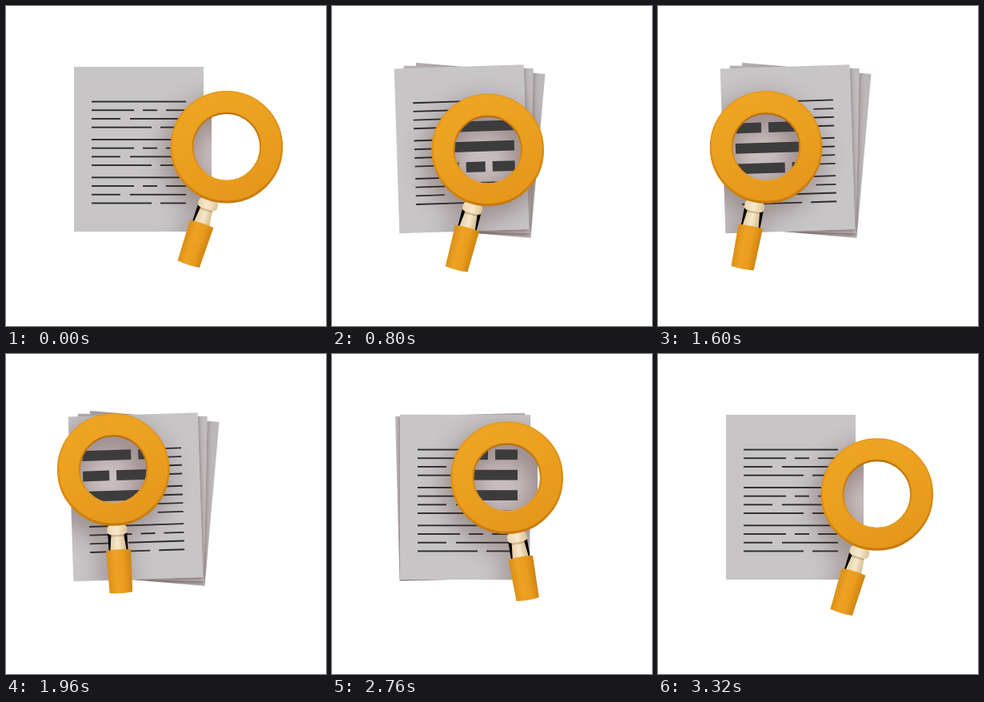
An HTML page with a canvas for the animation above (3360 ms loop, 400 by 400 pixels).

```html
<!DOCTYPE html>
<html lang="en">
<head>
<meta charset="utf-8">
<title>Document search</title>
<style>
  html, body { margin: 0; width: 100%; height: 100%; overflow: hidden; background: #fff; }
  canvas { display: block; width: 400px; height: 400px; }
</style>
</head>
<body>
<canvas id="stage" width="400" height="400"></canvas>
<script>
const ctx = document.getElementById('stage').getContext('2d');
const LOOP = 3360, STEP = 40;
const RAD = Math.PI / 180;

// Smooth looping motion through poses [time, ...values], without overshoot.
function motion(poses) {
  const n = poses.length;
  const time = i => poses[(i + n) % n][0] + Math.floor(i / n) * LOOP;
  const value = (i, k) => poses[(i + n) % n][k];
  const rate = (i, k) => (value(i + 1, k) - value(i, k)) / (time(i + 1) - time(i));
  const slope = (i, k) => {
    const a = rate(i - 1, k), b = rate(i, k);
    return a * b > 0 ? 2 * a * b / (a + b) : 0;
  };
  return t => {
    let i = 0;
    while (i < n - 1 && time(i + 1) <= t) i++;
    const d = time(i + 1) - time(i), u = (t - time(i)) / d, v = 1 - u;
    const ease = u * u * (3 - 2 * u);
    return poses[i].slice(1).map((p, j) => p + (value(i + 1, j + 1) - p) * ease
      + d * u * v * (v * slope(i, j + 1) - u * slope(i + 1, j + 1)));
  };
}

// Lens centre x, y and tilt in degrees.
const lensAt = motion([
  [0, 275.8, 176.3, 18],
  [270, 283, 179.5, 22.5],
  [480, 277.7, 182, 24],
  [560, 270.5, 182, 23],
  [800, 194.7, 180, 14.7],
  [1280, 163, 205.5, 13],
  [1600, 135, 176.5, 11],
  [1800, 116, 150, 4],
  [2080, 157, 143, -9],
  [2280, 198, 145, -15],
  [2760, 218.7, 154.8, -9.7]
]);

// Angles of the back, middle and front page.
const fanAt = motion([
  [0, 0, 0, 0],
  [280, 1.5, 0.8, -2.7],
  [480, 3.7, 1.1, -1.85],
  [720, 5, 1.2, -1.85],
  [2280, 5, 1.2, -1.85],
  [2760, 0.2, -1.5, 0],
  [3040, 0, 0, 0]
]);

const PAGE_COLORS = ['#bcb7b8', '#c0bbbc', '#c8c5c7'];
// Gaps in each line of text; the rows repeat down the page.
const SMALL_GAPS = [[], [160, 171, 189, 200], [143, 155], [182, 193]];
const LARGE_GAPS = [[162, 171, 195, 204], [134, 143], []];

function gradient(x0, y0, x1, y1, ...colors) {
  const g = ctx.createLinearGradient(x0, y0, x1, y1);
  colors.forEach((c, i) => g.addColorStop(i / (colors.length - 1), c));
  return g;
}

function layer(paint) {
  ctx.save();
  paint();
  ctx.restore();
}

function circle(x, y, r) {
  ctx.beginPath();
  ctx.arc(x, y, r, 0, Math.PI * 2);
}

// All pages turn about one point below the stack.
function onPage(angle, paint) {
  layer(() => {
    ctx.translate(155, 303);
    ctx.rotate(angle * RAD);
    ctx.translate(-155, -303);
    paint();
  });
}

// Shadows fall only on what is already painted.
function shade(blur, dx, dy, alpha) {
  ctx.globalCompositeOperation = 'source-atop';
  ctx.shadowColor = `rgba(70,42,38,${alpha})`;
  ctx.shadowBlur = blur;
  ctx.shadowOffsetX = dx;
  ctx.shadowOffsetY = dy;
}

function textLine(left, right, y, height, gaps) {
  const edges = [left, ...gaps, right];
  for (let i = 0; i < edges.length; i += 2) {
    ctx.fillRect(edges[i], y, edges[i + 1] - edges[i], height);
  }
}

function drawPages(fan) {
  fan.forEach((angle, i) => onPage(angle, () => {
    ctx.fillStyle = PAGE_COLORS[i];
    layer(() => {
      shade(6, 0, 2, 0.55);
      ctx.fillRect(85, 76, 162, 206);
    });
    ctx.fillRect(85, 76, 162, 206);
  }));
  onPage(fan[2], () => {
    ctx.fillStyle = '#2b2b2c';
    for (let i = 0; i < 12; i++) {
      const y = 118.6 + Math.floor(i / 4) * 47.4 + (i % 4) * 10.7;
      textLine(107, 225, y, 1.9, SMALL_GAPS[i % 4]);
    }
  });
}

function drawGlass(x, y, fan, tilt) {
  const inLens = paint => layer(() => {
    circle(x, y, 43);
    ctx.clip();
    onPage(fan[2], paint);
  });
  inLens(() => {
    ctx.fillStyle = '#cabfc1';
    ctx.fillRect(70, 60, 187, 240);
  });
  layer(() => {
    shade(34, -5, 11, 0.5);
    ctx.strokeStyle = '#eb9e1f';
    ctx.lineWidth = 28;
    circle(x, y, 56);
    ctx.stroke();
    ctx.translate(x, y);
    ctx.rotate(tilt * RAD);
    ctx.fillRect(-12, 80, 24, 70);
  });
  inLens(() => {
    ctx.fillStyle = '#3d3c3d';
    for (let i = 0; i < 6; i++) {
      textLine(101, 232, 119.4 + i * 25.4, 12.8, LARGE_GAPS[i % 3]);
    }
  });
}

// A straight-sided part of the handle, centred on its axis.
function taper(top, bottom, y0, y1, bend) {
  ctx.beginPath();
  ctx.moveTo(-top, y0);
  ctx.quadraticCurveTo(0, y0 - bend, top, y0);
  ctx.lineTo(bottom, y1);
  ctx.quadraticCurveTo(0, y1 + bend, -bottom, y1);
  ctx.fill();
}

function drawHandle(x, y, tilt) {
  layer(() => {
    ctx.translate(x, y);
    ctx.rotate(tilt * RAD);
    ctx.fillStyle = gradient(-10, 0, 10, 0, '#e3cda6', '#f7e8ca', '#d5bb8d');
    taper(7.5, 10.5, 78, 104, 0);
    ctx.fillStyle = 'rgba(130,90,40,.3)';
    taper(8, 8.5, 80, 84, 0);
    ctx.fillStyle = gradient(-13, 0, 13, 0, '#ead5ae', '#f8e9ce', '#dbc092');
    ctx.beginPath();
    ctx.roundRect(-12.5, 69, 25, 12.5, 5);
    ctx.fill();
    ctx.fillStyle = gradient(-15, 0, 15, 0, '#db8f17', '#eea223', '#e99c1d', '#cf8412');
    taper(15.5, 14.3, 101, 154, 2);
  });
}

function drawRing(x, y) {
  circle(x, y, 56);
  ctx.lineWidth = 28.6;
  ctx.strokeStyle = gradient(x - 10, y - 70, x + 14, y + 70, '#e59a1c', '#dc8e15', '#c67a0c');
  ctx.stroke();
  circle(x, y - 0.8, 55.8);
  ctx.lineWidth = 24.5;
  ctx.strokeStyle = gradient(x - 30, y - 65, x + 30, y + 65, '#efa422', '#eb9f1f', '#e4971b');
  ctx.stroke();
  circle(x, y, 42.2);
  ctx.lineWidth = 1.8;
  ctx.strokeStyle = gradient(x, y - 42, x, y + 42, '#b06a10', '#cd8414', '#eaa026');
  ctx.stroke();
}

function draw(t) {
  const [x, y, tilt] = lensAt(t), fan = fanAt(t);
  ctx.clearRect(0, 0, 400, 400);
  drawPages(fan);
  drawGlass(x, y, fan, tilt);
  drawHandle(x, y, tilt);
  drawRing(x, y);
}

const start = performance.now();
function tick() {
  const t = (performance.now() - start) % LOOP;
  draw(Math.floor(t / STEP) * STEP);
  requestAnimationFrame(tick);
}
tick();
</script>
</body>
</html>
```
